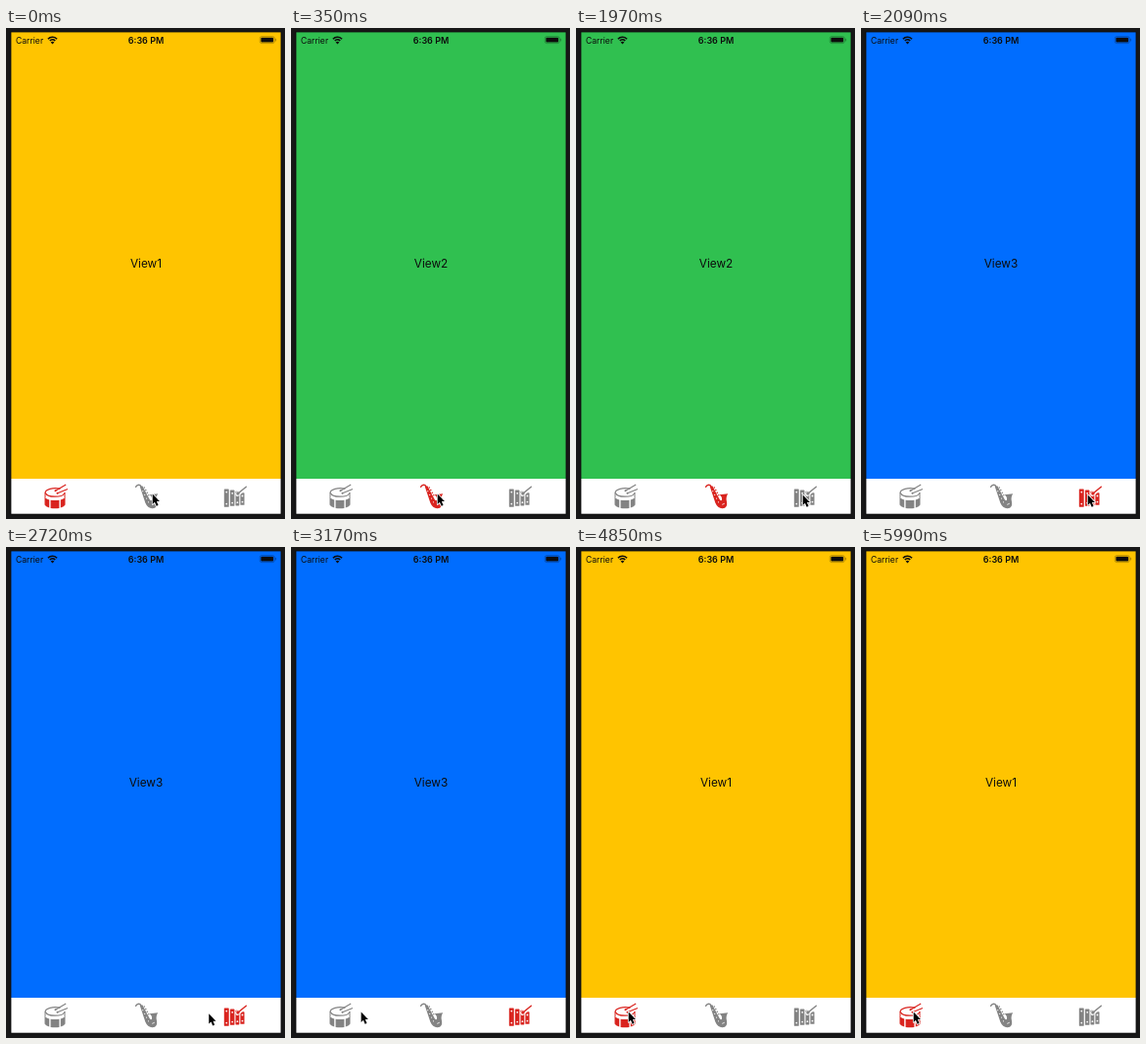
An HTML page with a canvas that plays this animation: 285x500 px, repeating every 6020 ms.

```html
<!DOCTYPE html>
<html lang="en">
<head>
<meta charset="utf-8">
<title>Tab bar</title>
<style>
html, body { margin: 0; width: 100%; height: 100%; overflow: hidden; background: #151515; }
canvas { display: block; width: 285px; height: 500px; }
</style>
</head>
<body>
<canvas id="stage"></canvas>
<script>
const W = 285, H = 500, LOOP = 6020;
const RED = '#d9241f', GRAY = '#838383', INK = '#0c0c0c';
const FONT = 'Inter, "Liberation Sans", sans-serif';
const canvas = document.getElementById('stage');
const ctx = canvas.getContext('2d');
const ratio = window.devicePixelRatio || 1;
canvas.width = W * ratio;
canvas.height = H * ratio;

const views = [
  { color: '#ffc400', label: 'View1' },
  { color: '#30c050', label: 'View2' },
  { color: '#006dff', label: 'View3' }
];

// start time and selected tab
const taps = [[0, 0], [300, 1], [2000, 2], [4310, 0]];

// time, x, y of the pointer tip
const path = [
  [0, 149, 474], [850, 149, 474], [1280, 219, 471], [1480, 231, 475],
  [2640, 231, 475], [3170, 71, 473], [3450, 53, 473], [LOOP, 53, 473]
];

function tabAt(t) {
  let tab = 0;
  for (const [start, index] of taps) if (t >= start) tab = index;
  return tab;
}

function pointerAt(t) {
  const i = path.findIndex(p => p[0] > t);
  const [t0, x0, y0] = path[i - 1], [t1, x1, y1] = path[i];
  const k = (t - t0) / (t1 - t0);
  return [x0 + (x1 - x0) * k, y0 + (y1 - y0) * k];
}

function rect(x, y, w, h, color) {
  ctx.fillStyle = color;
  ctx.fillRect(x, y, w, h);
}

function roundRect(x, y, w, h, r) {
  ctx.beginPath();
  ctx.roundRect(x, y, w, h, r);
}

function stroke(d, width, color) {
  ctx.lineWidth = width;
  ctx.strokeStyle = color;
  ctx.stroke(new Path2D(d));
}

function fill(d, color) {
  ctx.fillStyle = color;
  ctx.fill(new Path2D(d));
}

function dot(x, y, r, color) {
  ctx.fillStyle = color;
  ctx.beginPath();
  ctx.arc(x, y, r, 0, Math.PI * 2);
  ctx.fill();
}

function text(str, x, y, size, weight, align) {
  ctx.font = `${weight} ${size}px ${FONT}`;
  ctx.textAlign = align;
  ctx.fillStyle = INK;
  ctx.fillText(str, x, y);
}

function statusBar() {
  text('Carrier', 10, 15.8, 8.6, 400, 'left');
  text('6:36 PM', 143, 15.8, 9, 600, 'center');
  ctx.lineCap = 'butt';
  ctx.strokeStyle = INK;
  ctx.lineWidth = 1.6;
  for (const r of [3.7, 6.3]) {
    ctx.beginPath();
    ctx.arc(47.5, 15.6, r, -Math.PI * 0.76, -Math.PI * 0.24);
    ctx.stroke();
  }
  fill('M47.5 16.4L45.7 14.4Q47.5 13 49.3 14.4Z', INK);
  ctx.lineWidth = 0.7;
  ctx.strokeStyle = 'rgba(0,0,0,.35)';
  roundRect(259.3, 8.6, 15, 7, 2);
  ctx.stroke();
  ctx.fillStyle = INK;
  roundRect(260.4, 9.7, 12.8, 4.8, 1);
  ctx.fill();
  rect(275.2, 10.8, 0.9, 2.6, 'rgba(0,0,0,.35)');
}

function drum(c) {
  ctx.lineCap = 'round';
  stroke('M55 469.2Q50 468.2 45 469.3Q39.8 470.8 40.2 473.2Q41.5 477.2 50 477.2Q58.5 477.2 59.8 473.6', 1.2, c);
  stroke('M40 473.5V478M60 473.5V478', 1, c);
  fill('M39.5 478Q41.5 479.8 44.2 480.4V488.6Q40.5 487.6 39.5 485.6Z', c);
  fill('M45.6 480.7Q50 481.5 54.4 480.7V488.9Q50 489.6 45.6 488.9Z', c);
  fill('M60.5 478Q58.5 479.8 55.8 480.4V488.6Q59.5 487.6 60.5 485.6Z', c);
  stroke('M50.5 471.2L60.8 465.2M52.5 473.7L62.5 469.7', 1.2, c);
  dot(50.5, 471.3, 1, c);
  dot(52.5, 473.7, 1, c);
}

function sax(c) {
  ctx.lineCap = 'round';
  stroke('M132.6 467.2L134.2 465.6Q137 464.6 138 467.3', 1.4, c);
  fill('M136.8 467L139.3 466.3L146.8 480.2Q148.4 482 149 480.4Q149.6 477.6 146.6 475.2L155.2 474.2Q152.6 478.2 154 482.4Q155.4 488.8 149.6 489.2Q144.8 489.4 142.4 483.8Z', c);
  for (let i = 0; i < 4; i++) {
    dot(141.3 + i * 1.5, 468 + i * 2.6, 0.8, c);
    dot(139.8 + i * 1.9, 471.7 + i * 3.7, 0.6, '#fff');
  }
  stroke('M149.6 485.2L151.4 484.4', 0.8, '#fff');
}

function xylophone(c) {
  const bars = [[222.8, 469.4, 4.9, 18.4], [228.9, 470.6, 4.5, 16.2], [234.5, 471.8, 3.8, 14.6], [239.4, 473.3, 4.1, 12.5]];
  for (const [x, y, w, h] of bars) {
    ctx.fillStyle = c;
    roundRect(x, y, w, h, 0.6);
    ctx.fill();
    dot(x + w / 2, y + 3.2, 0.9, '#fff');
    dot(x + w / 2, y + h - 3.2, 0.9, '#fff');
  }
  ctx.lineCap = 'round';
  stroke('M236.5 474.5L246 466.8', 4.6, '#fff');
  stroke('M237 474L245.3 467.2', 1.4, c);
  dot(236.9, 474, 1.7, c);
}

function pointer(x, y) {
  ctx.save();
  ctx.translate(x + 0.7, y + 0.6);
  ctx.scale(0.86, 0.92);
  const d = 'M0 0V11.2L2.6 8.9L4.6 13.3L6.8 12.3L4.9 8H8.4Z';
  ctx.lineJoin = 'round';
  stroke(d, 1.8, '#fff');
  fill(d, '#000');
  ctx.restore();
}

function draw(t) {
  const tab = tabAt(t), view = views[tab];
  ctx.setTransform(ratio, 0, 0, ratio, 0, 0);
  rect(0, 0, W, H, '#171717');
  rect(4, 3.5, 277.5, 492, '#101010');
  rect(5.4, 4.4, 275.2, 454.6, view.color);
  rect(5.4, 459, 275.2, 35.7, '#fff');
  statusBar();
  text(view.label, 143, 243.8, 11.8, 400, 'center');
  [drum, sax, xylophone].forEach((icon, i) => icon(i === tab ? RED : GRAY));
  pointer(...pointerAt(t));
}

const start = performance.now();
function tick() {
  draw((performance.now() - start) % LOOP);
  requestAnimationFrame(tick);
}
tick();
</script>
</body>
</html>
```
